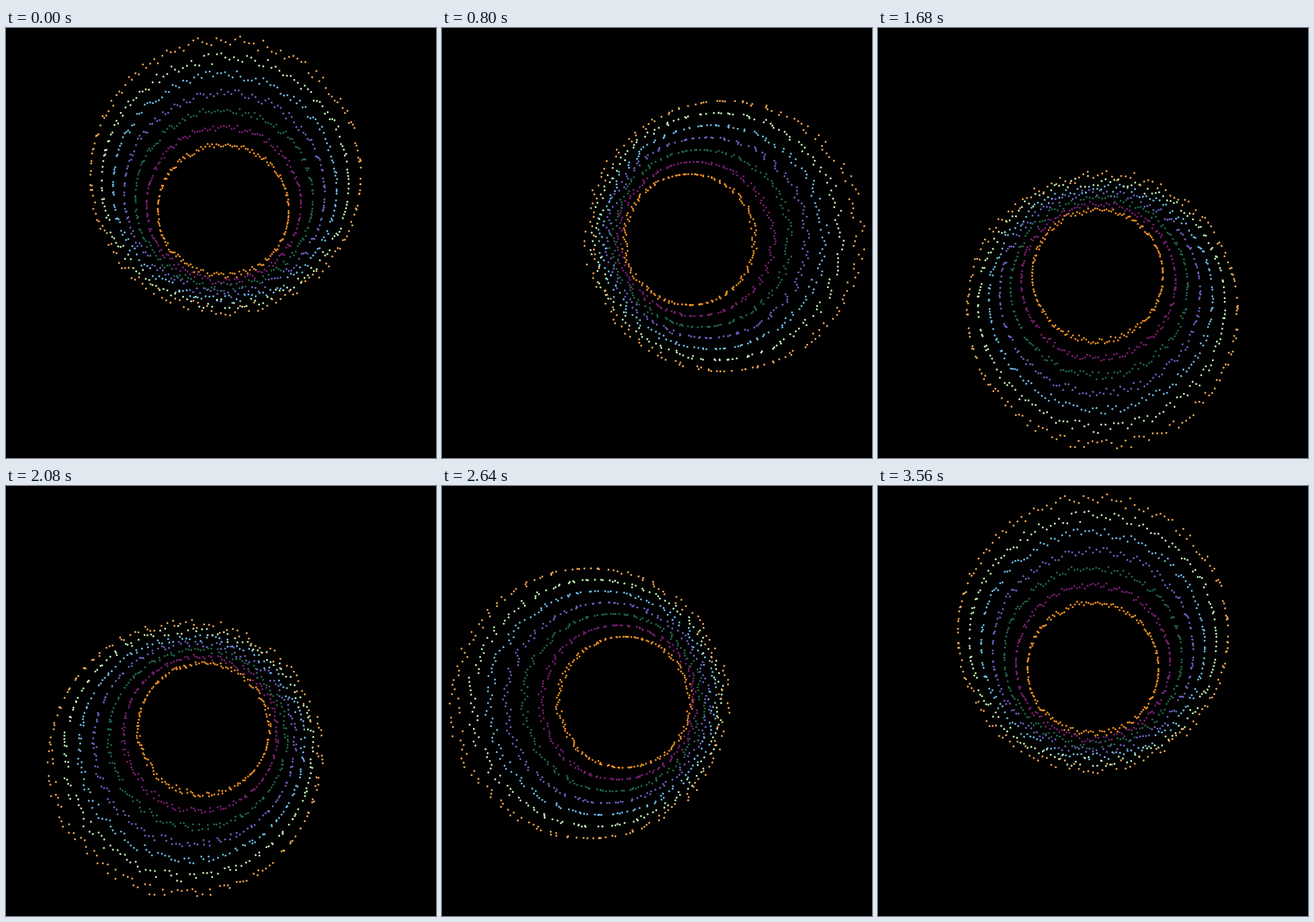
Animation of 640 by 640 pixels, one loop 3600 ms. Source, as an HTML page with a canvas:

```html
<!DOCTYPE html>
<html lang="en">
<head>
<meta charset="utf-8">
<title>Orbiting rings</title>
<style>
  html, body { margin: 0; width: 100%; height: 100%; overflow: hidden; background: #000; }
  canvas { display: block; }
</style>
</head>
<body>
<canvas id="stage" width="640" height="640"></canvas>
<script>
const ctx = document.getElementById('stage').getContext('2d');
const TAU = Math.PI * 2;
const CENTER = 320;
const LOOP = 3600;
const STEP = 40;
const DOTS = 180;
const colors = ['#ee8f22', '#7d1f78', '#20694d', '#6c62c4', '#6cbce6', '#c2f0b6', '#eda653'];

let seed = 11;
function random() {
  seed = (seed * 16807) % 2147483647;
  return seed / 2147483647;
}

// Every dot sits on its ring and travels on its own slightly different orbit.
const rings = colors.map((color, ring) => {
  const radius = 97.5 + 17.25 * ring;
  const dots = Array.from({ length: DOTS }, (_, i) => {
    const angle = i / DOTS * TAU;
    return {
      x: CENTER + radius * Math.cos(angle),
      y: CENTER + radius * Math.sin(angle),
      orbit: radius * (0.5 + 0.09 * (random() - 0.5))
    };
  });
  return { color, dots };
});

function draw(time) {
  const frame = Math.floor(time % LOOP / STEP);
  const turn = (frame + 1) * STEP / LOOP * TAU;
  const dx = Math.sin(turn), dy = -Math.cos(turn);
  ctx.fillStyle = '#000';
  ctx.fillRect(0, 0, 640, 640);
  for (const { color, dots } of rings) {
    ctx.fillStyle = color;
    ctx.beginPath();
    for (const { x, y, orbit } of dots) {
      const px = x + orbit * dx, py = y + orbit * dy;
      ctx.moveTo(px + 1.5, py);
      ctx.arc(px, py, 1.5, 0, TAU);
    }
    ctx.fill();
  }
}

const start = performance.now();
function tick() {
  draw(performance.now() - start);
  requestAnimationFrame(tick);
}
tick();
</script>
</body>
</html>
```
